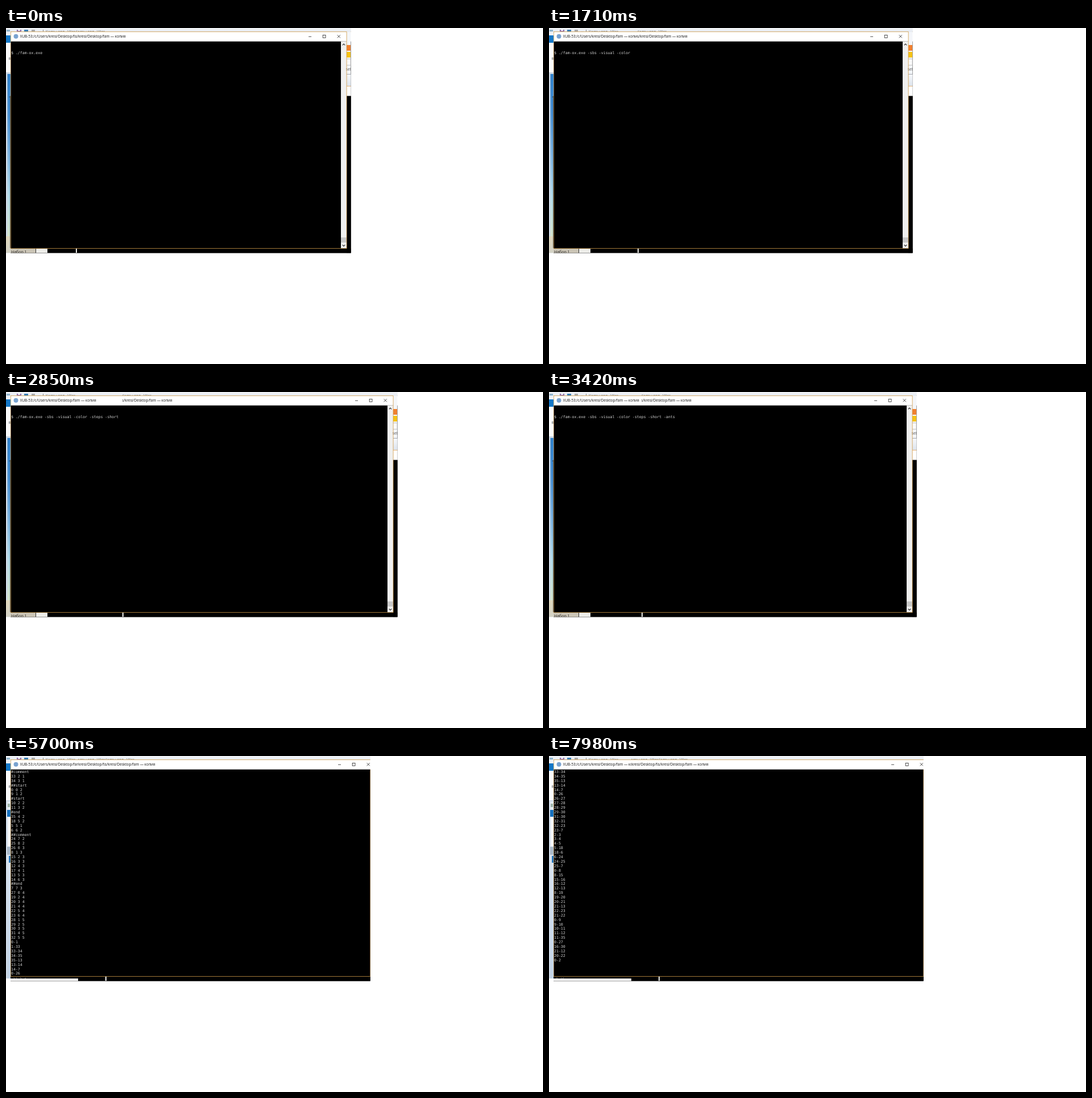
These frames come from a looping animation (946 by 592 pixels, 8 s). An HTML page with a canvas:

```html
<!DOCTYPE html>
<html lang="ru">
<head>
<meta charset="utf-8">
<title>Console session</title>
<style>
  html, body { margin: 0; width: 100%; height: 100%; overflow: hidden; background: #fff; }
  canvas { display: block; }
</style>
</head>
<body>
<canvas id="stage" width="946" height="592"></canvas>
<script>
const ctx = document.getElementById('stage').getContext('2d');
const LOOP = 8000, STEP = 570, HEIGHT = 396.5;
const ROW = 7.9, FIRST_ROW = 29.9, HAIR = 0.8, GOLD = '#cf9a48';
const MONO = '"DejaVu Sans Mono", monospace';
const COMMAND = '$ ./fam-ox.exe -sbs -visual -color -steps -short -ants < ship';
const TITLE = 'XUB-53:/c/Users/kresi/Desktop/fam — копия';

// Each state: horizontal slip of the right-hand part, typed characters, scrolled rows
const STATES = [
  [0, 14], [33, 19], [41, 27], [33, 34], [64, 41], [82, 48], [40, 54], [51, 61],
  [186, 61, 0], [52, 61, 4], [52, 61, 8], [54, 61, 16], [50, 61, 24], [67, 61, 40], [70, 61, 48]
];

const ROOMS = `42|2 2 0|3 3 0|4 4 0|1 1 1|#comment|33 2 1|34 3 1|##start|0 0 2|9 1 2|#start|10 2 2|11 3 2|#end|35 4 2|18 5 2|5 5 1|6 6 2|##comment|24 7 2|25 8 2|26 0 3|8 1 3|15 2 3|16 3 3|12 4 3|17 4 1|13 5 3|14 6 3|##end|7 7 3|27 0 4|19 2 4|20 3 4|21 4 4|22 5 4|23 6 4|28 1 5|29 2 5|30 3 5|31 4 5|32 5 5`;
const LINKS = `0-1 1-33 33-34 34-35 35-13 13-14 14-7 0-26 26-27 27-28 28-29 29-30 31-30 32-31 32-23 23-7 2-3 3-4 4-5 5-18 18-6 6-24 24-25 25-7 0-8 8-15 15-16 16-12 12-13 8-19 19-20 20-21 21-13 22-23 21-22 0-9 9-10 10-11 11-12 11-35 0-27 16-30 21-12 20-22 0-2`;
const OUTPUT = [...ROOMS.split('|'), ...LINKS.split(' ')];

function rect(color, x, y, w, h) {
  ctx.fillStyle = color;
  ctx.fillRect(x, y, w, h);
}

function text(value, x, y, color, size = 6.4, family = '"Open Sans", sans-serif') {
  ctx.font = `${size}px ${family}`;
  ctx.fillStyle = color;
  ctx.fillText(value, x, y);
}

function line(color, width, ...points) {
  ctx.strokeStyle = color;
  ctx.lineWidth = width;
  ctx.beginPath();
  for (let i = 0; i < points.length; i += 2) ctx.lineTo(points[i], points[i + 1]);
  ctx.stroke();
}

function clipped(x, y, w, h, draw) {
  ctx.save();
  ctx.beginPath();
  ctx.rect(x, y, w, h);
  ctx.clip();
  draw();
  ctx.restore();
}

function verticalFill(x, y, w, h, colors) {
  const fill = ctx.createLinearGradient(0, y, 0, y + h);
  colors.forEach((c, i) => fill.addColorStop(i / (colors.length - 1), c));
  rect(fill, x, y, w, h);
}

function drawToolbar() {
  verticalFill(0, 0, 946, 7, ['#f2f4f7', '#e6ebf2']);
  clipped(0, 0, 946, 6.3, () => {
    rect('#8fb4cc', 1, 3, 6, 4);
    rect('#8d6aa8', 19, 3, 8, 4);
    rect('#f4f4fa', 21, 3, 4, 2);
    rect('#3c7fb4', 32, 3, 7, 4);
    rect('#a9a9a9', 45, 3, 6, 4);
    rect('#444', 56, 6, 5, 1);
    rect('#888', 65, 3, 1, 4);
    text('Кадры.png - Vilor', 70, 8.5, '#666');
  });
}

function drawRightBackdrop() {
  rect('#f4f6f9', 548, 7, 20, 113);
  rect('#f08030', 548, 30, 7, 10);
  rect('#f5c316', 548, 42, 7, 10);
  rect('#c4c4c4', 548, 54, 7.5, 12);
  rect('#fafafa', 548, 55, 6.7, 10);
  text('set', 547, 75, '#555', 6.2);
  rect('#8c929c', 548, 81, 9, HAIR);
  verticalFill(548, 82, 9, 20, ['#f6f8fb', '#dde4ed']);
  rect('#e3a55b', 548, 102, 9, HAIR);
  rect('#fff', 548, 103, 9, 16.7);
  rect('#000', 548, 119.7, 9, 277);
}

function drawScrollbar() {
  rect('#f0f0f0', 538, 23.7, 10, 364.2);
  rect('#c9c9c9', 538, 369, 10, 9);
  line('#333', 1.2, 540.7, 30.3, 543, 28, 545.3, 30.3);
  line('#333', 1.2, 540.7, 382, 543, 384.3, 545.3, 382);
}

function drawCaptionButtons() {
  line('#222', HAIR, 481, 15.2, 486, 15.2);
  ctx.strokeRect(506.2, 12.4, 4.8, 4.8);
  line('#222', HAIR, 531.7, 12.2, 536.9, 17.4);
  line('#222', HAIR, 536.9, 12.2, 531.7, 17.4);
}

function drawWindow(right) {
  drawToolbar();
  rect('#000', 8, 388, 900, 9);
  rect('#fff', 8, 7, right - 8, 17);
  rect('#000', 8, 23.7, right - 8, 364.3);
  rect(GOLD, 8, 6.3, right - 8, HAIR);
  rect(GOLD, 8, 387.9, right - 8, HAIR);
  rect(GOLD, 7.9, 6.3, HAIR, 382.4);
  ctx.fillStyle = '#79a3d0';
  ctx.beginPath();
  ctx.arc(17.5, 14.8, 4, 0, 7);
  ctx.fill();
  text(TITLE, 24.7, 17.4, '#111');
}

function drawTaskGap() {
  rect('#eeeeea', 53, 388.7, 20, 8);
}

// A copy of the window pasted further right, visible from a local x onwards
function pasteWindow(dx, from, cut, withEdge) {
  clipped(from + dx, 0, cut - from - dx, HEIGHT, () => {
    ctx.translate(dx, 0);
    drawWindow(withEdge ? 548 : 946);
    drawTaskGap();
    if (withEdge) {
      drawScrollbar();
      drawRightBackdrop();
      rect(GOLD, 547.7, 6.3, HAIR, 382.4);
    }
    drawCaptionButtons();
  });
}

function drawLeftBackdrop(listView, bottom) {
  clipped(0, 7, 7.9, bottom - 7, () => {
    rect('#eef2f7', 0, 7, 8, 390);
    rect('#1477c6', 0, 13, 8, 13);
    rect('#fafbfc', 0, 26, 8, 52);
    text('В', 4.5, 56, '#444', 6);
    rect('#cfdae7', 0, 78, 8, 319);
    if (listView) {
      verticalFill(2, 80, 6, 317, ['#e6edf5', '#d3dfed', '#c2d3e6']);
      rect('#9eb4a8', 3, 84, 4, 6);
      rect('#1670bd', 2, 95, 6, 12);
      rect('#f5f7fa', 3, 108, 5, 51);
      rect('#aab9c8', 2, 160, 6, 14);
      rect('#2373b8', 5, 176, 3, 12);
    } else {
      verticalFill(2.5, 81, 5.5, 286, ['#2f80c9', '#4b92d4', '#80b6e2', '#b4dcea', '#d4e5cd']);
      verticalFill(0, 367, 8, 30, ['#e0d8bd', '#d3d2c6']);
      rect('#333', 5.5, 121, 2, HAIR);
      rect('#222', 7.1, 119.7, HAIR, 268);
    }
  });
}

function drawBottomLeft(k, seam) {
  clipped(8, 388.7, seam - 8, bottomEdge - 388.7, () => {
    if (k < 8) {
      rect('#cbc5b6', 8, 388.7, 44, 8);
      text('Набор 1', 9, 397, '#222', 7);
      rect('#333', 52, 388.7, 1, 8);
      drawTaskGap();
    } else if (k === 8) {
      rect('#000', 8, 388.7, 42, 9);
      rect('#f1f3f4', 50, 388.7, 93, 9);
      rect('#222', 143, 388.7, 57, 9);
      text('128', 152, 393, '#888', 6.5, MONO);
      rect('#fafafa', 200, 388.7, 61, 9);
      rect('#aaa', 220, 389, 7, 1);
      rect('#338fd0', 221, 393, 4, 4);
      rect('#777', 231, 395, 3, 2);
    } else {
      rect('#000', 8, 388.7, seam - 8, 3.3);
      rect('#fff', 8, 392, seam - 8, 5);
      clipped(8, 389, 60, 3, () => text(k === 14 ? '8-15' : '33 3 4', 12, 394.5, '#888', 6.5, MONO));
    }
  });
}
const bottomEdge = HEIGHT;

function drawConsole(typed, scroll) {
  const finished = scroll !== undefined;
  const lines = ['', '', COMMAND.slice(0, typed), ...(finished ? OUTPUT : [])];
  const top = scroll || 0;
  lines.slice(top, top + 46).forEach((value, row) =>
    text(value, 9, FIRST_ROW + row * ROW, '#d4d4d4', 6.55, MONO));
}

function draw(time) {
  const k = Math.min(STATES.length - 1, Math.floor(time % LOOP / STEP));
  const [slip, typed, scroll] = STATES[k];
  const cropped = k >= 8;
  const width = k === 8 ? 640 : slip + (cropped ? 589.7 : 607.7);
  const listView = [8, 9, 10, 13, 14].includes(k);

  rect('#fff', 0, 0, 946, 592);
  clipped(0, 0, width, HEIGHT, () => {
    drawWindow(946);
    drawLeftBackdrop(listView, k > 8 ? 392 : HEIGHT);
    drawBottomLeft(k, slip + (cropped ? 75 : 123));
    if (k === 8) {
      rect('#333', 50, 0, 211, HAIR);
      rect('#35513f', 55, 3, 8, 3);
    }
    if (cropped) pasteWindow(slip, 75, width, false);
    pasteWindow(slip + 52, 71, width, !cropped);
    if (k > 8) rect(GOLD, width - HAIR, 23.7, HAIR, 365);
    drawConsole(typed, scroll);
  });
}

function tick() {
  draw(performance.now());
  requestAnimationFrame(tick);
}
tick();
</script>
</body>
</html>
```
